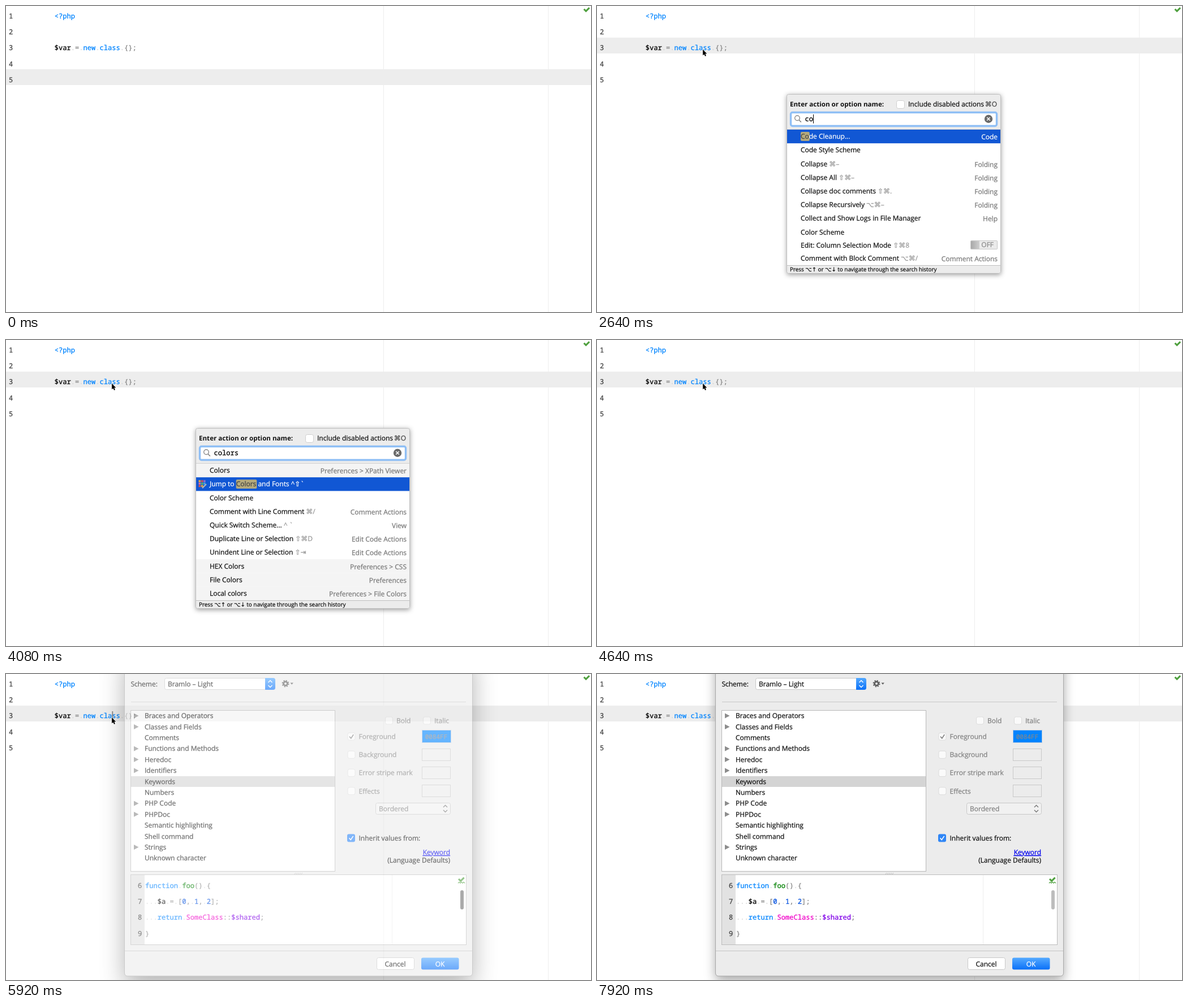
An HTML page that plays this animation: 1034x542 px, repeating every 8 s.

```html
<!DOCTYPE html>
<html lang="en">
<head>
<meta charset="utf-8">
<title>Color scheme lookup</title>
<style>
html, body { margin: 0; width: 100%; height: 100%; overflow: hidden; background: #fff; }
svg { display: block; }
text { font: 11.97px "Open Sans", "DejaVu Sans", sans-serif; white-space: pre; text-rendering: geometricPrecision; stroke-width: .25px; }
.mono { font: 12.083px "Noto Sans Mono", "DejaVu Sans Mono", monospace; stroke-width: .3px; }
.small { font-size: 9.9px; }
.bold { font-weight: bold; font-size: 11.6px; stroke-width: 0; }
</style>
</head>
<body>
<svg id="stage" width="1034" height="542" viewBox="0 0 1034 542"></svg>
<script>
const LOOP = 8000, STEP = 80;
const BLUE = '#0084ff', GREY = '#888', PALE = '#c8c8c8';
const stage = document.getElementById('stage');
const pen = document.createElement('canvas').getContext('2d');
pen.font = '11.97px "Open Sans", "DejaVu Sans", sans-serif';

const rect = (x, y, w, h, fill, more = '') =>
  `<rect x="${x}" y="${y}" width="${w}" height="${h}" fill="${fill}" ${more}/>`;
const box = (x, y, w, h, fill, stroke, r = 0) =>
  rect(x + .5, y + .5, w - 1, h - 1, fill, `stroke="${stroke}" rx="${r}"`);
// A hairline stroke in the fill colour gives glyphs a slightly heavier weight.
const ink = color => `fill="${color}" stroke="${color}"`;
const span = (s, color) => `<tspan ${ink(color)}>${s}</tspan>`;
const text = (x, y, s, color = '#111', more = '') =>
  `<text x="${x}" y="${y}" ${ink(color)} ${more}>${s}</text>`;
const line = (d, stroke, width = 1, more = '') =>
  `<path d="${d}" fill="none" stroke="${stroke}" stroke-width="${width}" ${more}/>`;
const shape = (d, fill, more = '') => `<path d="${d}" fill="${fill}" ${more}/>`;
const END = 'text-anchor="end"', MID = 'text-anchor="middle"', MONO = 'class="mono"';
const between = (t, a, b) => t >= a && t < b;

// Code made of [text, colour] pairs; spaces show as faint dots.
const code = (x, y, parts) => text(x, y, parts.map(([s, color]) =>
  span(s.replace(/</g, '&lt;').replace(/ +/g, gap => span('.'.repeat(gap.length), '#d4d4d4')), color)
).join(''), '#000', MONO);

const tick = (x, y) => line(`M${x} ${y}l3.6 3.6l6 -6`, '#4fa03f', 3);
const arrows = (x, y, color) =>
  line(`M${x - 3.5} ${y - 2.5}l3.5 -3.5l3.5 3.5M${x - 3.5} ${y + 2.5}l3.5 3.5l3.5 -3.5`, color, 1.4);
const check = (x, y, color) => line(`M${x + 3.5} ${y + 7}l2.8 3.2l4.4 -6.6`, color, 1.6);

function editor(t) {
  const current = t < 1120 ? 4 : 2;
  let out = rect(0, 0, 1034, 542, '#fff') + rect(667, 0, 1, 542, '#ededed') + rect(958, 0, 1, 542, '#ededed');
  out += rect(0, current * 28, 1034, 28, '#ededed');
  for (let i = 0; i < 5; i++) out += text(5, 22 + i * 28.2, i + 1, '#444', MONO);
  out += code(85.7, 21.7, [['<?php', BLUE]]);
  out += code(85.7, 78.3, [['$var', '#000'], [' = ', GREY], ['new class', BLUE], [' {};', GREY]]);
  if (between(t, 1200, 2080) || between(t, 5760, 6080)) out += rect(187.4, 66, 1.8, 12, '#888');
  return out + tick(1021.5, 5.5);
}

function pointer(t) {
  if (t < 160 || t >= 6720) return '';
  const enter = 1 - (1 - Math.min(1, (t - 160) / 800)) ** 2;
  const leave = Math.max(0, (t - 6320) / 400) ** 2;
  const x = 503 - 316 * enter + 400 * leave, y = 460 - 383 * enter + 470 * leave;
  return shape('M0 0V10.6L2.4 8.4L4 12L5.9 11.2L4.3 7.6H7.4Z', '#000',
    `transform="translate(${x} ${y})" stroke="#fff" stroke-width="1.2" paint-order="stroke"`);
}

// Rows: name | shortcut | group
const collapse = ['Collapse|⌘–|Folding', 'Collapse All|⇧⌘–|Folding', 'Collapse doc comments|⇧⌘.|Folding',
  'Collapse Recursively|⌥⌘–|Folding', 'Collect and Show Logs in File Manager||Help', 'Color Scheme||'];
const column = 'Edit: Column Selection Mode|⇧⌘8|OFF';
const prefs = ['HEX Colors||Preferences &gt; CSS', 'File Colors||Preferences',
  'Local colors||Preferences &gt; File Colors'];
const colors = ['Colors||Preferences &gt; XPath Viewer', 'Jump to Colors and Fonts|^⇧`|', 'Color Scheme||',
  'Comment with Line Comment|⌘/|Comment Actions', 'Quick Switch Scheme...|^ `|View',
  'Duplicate Line or Selection|⇧⌘D|Edit Code Actions', 'Unindent Line or Selection|⇧⇥|Edit Code Actions', ...prefs];
const results = [
  [0, []],
  [2640, ['Code Cleanup...||Code', 'Code Style Scheme||', ...collapse, column,
    'Comment with Block Comment|⌥⌘/|Comment Actions']],
  [2800, [...collapse, column, ...prefs]],
  [2960, [colors[2], colors[0], colors[1], ...colors.slice(3)]],
  [3360, colors]
];
const keyTimes = [2560, 2640, 2800, 2960, 3040, 3280];

function paletteIcon(y) {
  const tones = ['#e8a33a', '#d9534f', '#8e6bd0', '#e06c9f', '#5bb56a', '#4aa3e0', '#d9534f', '#e8a33a'];
  return tones.map((c, i) => rect(340.5 + i % 3 * 4.3, y - 7 + (i / 3 | 0) * 4.3, 3.5, 3.5, c)).join('') +
    line(`M347 ${y + 7}L354 ${y}`, '#b8b8b8', 2.2);
}

function row(spec, y, h, selected, query) {
  const [name, keys, group] = spec.split('|');
  const mid = y + h / 2, base = mid + 4;
  let out = '';
  if (selected) out += rect(336, y, 377, h, '#1157d4');
  else if (group.startsWith('Preferences')) out += rect(336, y, 377, h, '#f4f4f4');
  let label = name;
  const at = name.toLowerCase().indexOf(query);
  if (selected && at >= 0) {
    const hit = name.slice(at, at + query.length);
    out += rect(360 + pen.measureText(name.slice(0, at)).width, mid - 8, pen.measureText(hit).width + 1, 16,
      '#b5aa7c', 'rx="2"');
    label = name.slice(0, at) + span(hit, '#444') + name.slice(at + hit.length);
  }
  if (name.startsWith('Jump')) out += paletteIcon(mid);
  out += text(360, base, `${label} ${span(keys, selected ? '#fff' : '#999')}`, selected ? '#fff' : '#111');
  if (group === 'OFF') {
    return out + box(660, mid - 8.5, 48, 16, '#ebebeb', '#c6c6c6', 1) +
      rect(661, mid - 7.5, 15, 14, 'url(#knob)') + text(701, base - 1, 'OFF', '#8a8a8a', END);
  }
  return out + text(708, base + 1, group, selected ? '#fff' : '#777', END);
}

function popup(t) {
  if (!between(t, 2240, 4640)) return '';
  const alpha = t < 2320 ? .6 : t < 4480 ? 1 : t < 4560 ? .6 : .25;
  const query = 'colors'.slice(0, keyTimes.filter(k => t >= k).length);
  const rows = results.filter(r => t >= r[0]).pop()[1];
  const chosen = t >= 3600 ? 1 : 0;
  let y = 219, list = '';
  rows.forEach((spec, i) => {
    const h = spec === column ? 22.2 : 24.2;
    list += row(spec, y, h, i === chosen, query);
    y += h;
  });
  const bottom = Math.round(rows.length ? y + 14.7 : y);
  let out = rect(335.5, 156, 378.5, bottom - 156, '#ececec',
    'rx="3" style="filter:drop-shadow(0 2px 4px rgba(0,0,0,.4))"');
  if (rows.length) {
    out += rect(336, 219, 377, y - 219, '#fff') + list + rect(336, 218, 377, 1, '#d0d0d0') +
      rect(336, y, 377, 1, '#c0c0c0') +
      text(341, y + 11.2, 'Press ⌥↑ or ⌥↓ to navigate through the search history', '#111', 'class="small"');
  }
  out += box(335, 156, 379, bottom - 156, 'none', '#c0c0c0', 3);
  out += text(341, 178, 'Enter action or option name:', '#111', 'class="bold"');
  out += box(529, 167, 15, 15, '#fff', '#cfcfcf', 3) + text(550, 178, 'Include disabled actions') +
    text(707, 178, '⌘O', '#444', END);
  out += rect(342.5, 188.5, 364, 24, '#fff', 'rx="3" stroke="#8fbff5" stroke-width="3.4"');
  out += '<circle cx="354" cy="198.5" r="4.3" fill="none" stroke="#777" stroke-width="1.2"/>' +
    line('M357.2 202l3.6 3.8', '#777', 1.4);
  out += text(367.5, 204, query, '#000', MONO);
  if (between(t, 2320, 4080)) out += rect(367.5 + query.length * 7.25, 192, 1, 16, '#000');
  if (query) out += '<circle cx="692" cy="200" r="7.2" fill="#6a6a6a"/>' +
    line('M689.3 197.3l5.4 5.4m0 -5.4l-5.4 5.4', '#fff', 1.5);
  return `<g opacity="${alpha}">${out}</g>`;
}

const tree = ['+Braces and Operators', '+Classes and Fields', 'Comments', '+Functions and Methods', '+Heredoc',
  '+Identifiers', 'Keywords', 'Numbers', '+PHP Code', '+PHPDoc', 'Semantic highlighting', 'Shell command',
  '+Strings', 'Unknown character'];

function treePane() {
  let out = box(220, 64, 362, 286, '#fff', '#b8b8b8');
  tree.forEach((item, i) => {
    const y = 74 + i * 19.4;
    if (item === 'Keywords') out += rect(221, 181, 360, 19, '#d4d4d4');
    if (item[0] === '+') out += shape(`M226 ${y - 4.5}l8.5 4.5l-8.5 4.5z`, '#8c8c8c');
    out += text(245, y + 4.2, item.replace('+', ''));
  });
  return out;
}

function attributes() {
  const option = (x, y, label) =>
    box(x, y - 7, 14, 14, '#fafafa', '#dcdcdc', 3) + text(x + 20, y + 4.3, label, '#808080');
  let out = option(670, 82.5, 'Bold') + option(737, 82.5, 'Italic');
  ['Foreground', 'Background', 'Error stripe mark', 'Effects'].forEach((label, i) => {
    const y = 110.7 + i * 32.2;
    out += option(603.5, y, label);
    if (i) out += box(735, Math.round(y) - 11, 51, 22, '#ececec', PALE);
  });
  out += check(603.5, 103.7, '#808080') + box(735, 99, 52, 23, BLUE, '#a9c4e4') +
    text(760.5, 114.5, '0084FF', '#7c8794', 'class="mono" text-anchor="middle" style="font-size:11px"');
  out += box(653, 228, 133, 21, '#f1f1f1', PALE, 3) + text(659, 243, 'Bordered', '#808080') +
    arrows(776.5, 238.5, '#777');
  out += rect(603, 283.5, 14, 14, '#2f86f6', 'rx="3"') + check(603, 283.5, '#fff') +
    text(623.5, 295, 'Inherit values from:');
  return out + text(785, 320, 'Keyword', '#0000ee', END + ' text-decoration="underline"') +
    text(785, 333.5, '(Language Defaults)', '#111', END);
}

function preview(t) {
  const fade = Math.min(1, Math.max(0, (t - 7280) / 320));
  const shade = Math.round(115 + 73 * fade);
  let out = box(220, 355, 594, 125, '#fff', '#bcbcbc') + rect(221, 356, 24, 123, '#e2e2e2') +
    rect(682, 356, 1, 123, '#ededed');
  for (let i = 0; i < 4; i++) out += text(233, 379 + i * 28.2, i + 6, '#444', MONO);
  out += code(246, 379, [['function ', BLUE], ['foo', '#008000'], ['() {', GREY]]);
  out += code(246, 407.2, [['   ', GREY], ['$a', '#000'], [' = [', GREY], ['0', '#0050e0'], [', ', GREY],
    ['1', '#0050e0'], [', ', GREY], ['2', '#0050e0'], ['];', GREY]]);
  out += code(246, 435.4, [['   ', GREY], ['return ', BLUE], ['SomeClass', '#f000c8'], ['::', GREY],
    ['$shared', '#8000e8'], [';', GREY]]);
  out += code(246, 463.6, [['}', GREY]]);
  out += tick(800, 363) + line('M799 370.5l2 -2l2 2l2 -2l2 2l2 -2l2 2', '#4fa03f', 1.1);
  return out + rect(803, 383, 6, 34, `rgb(${shade},${shade},${shade})`, 'rx="3"');
}

function dialog(t) {
  if (t < 5920) return '';
  const shadow = t < 6080 ? '0 18px 22px rgba(0,0,0,.5)' : '0 8px 10px rgba(0,0,0,.35)';
  let out = rect(210, -40, 614.5, 575, '#ececec', `rx="5" style="filter:drop-shadow(${shadow})"`) +
    rect(209.5, -40, 615, 575, 'none', 'rx="5" stroke="#a8a8a8"');
  out += text(220.5, 22, 'Scheme:') + box(280, 7, 196, 21, '#fff', PALE, 3) +
    text(286, 21.7, 'Bramlo – Light') +
    shape('M458 7h14q4 0 4 4v13q0 4 -4 4h-14z', 'url(#accent)') + arrows(467, 17.5, '#fff');
  out += '<circle cx="494" cy="17" r="3.4" fill="none" stroke="#5c5c5c" stroke-width="2.6"/>' +
    '<circle cx="494" cy="17" r="5.4" fill="none" stroke="#5c5c5c" stroke-width="2" stroke-dasharray="2.1 2.14"/>' +
    shape('M502.5 15.5h5.4l-2.7 3.2z', '#5c5c5c');
  out += rect(221, 49, 592, 1, PALE) + treePane() + attributes();
  out += line('M510 355l2 -3m1 3l2 -3m1 3l2 -3m1 3l2 -3m1 3l2 -3', '#b4b4b4', .8);
  out += preview(t) + rect(210, 490, 614, 1, '#c4c4c4');
  out += box(655, 502, 67, 22, '#fff', PALE, 3) + text(688, 517.7, 'Cancel', '#111', MID);
  out += rect(734, 502.5, 66.5, 21, 'url(#accent)', 'rx="3"') + text(767, 517.7, 'OK', '#fff', MID);
  return `<g opacity="${t < 6000 ? .6 : 1}">${out}</g>`;
}

const gradient = (id, from, to, turn) => `<linearGradient id="${id}" gradientTransform="rotate(${turn})">
  <stop stop-color="${from}"/><stop offset="1" stop-color="${to}"/></linearGradient>`;
const defs = `<defs>${gradient('accent', '#55aaff', '#0a70f8', 90)}${gradient('knob', '#a8a8a8', '#cfcfcf', 0)}</defs>`;

let shown = -1;
const start = performance.now();
function frame() {
  const t = Math.floor((performance.now() - start) % LOOP / STEP) * STEP;
  if (t !== shown) {
    stage.innerHTML = defs + editor(t) + popup(t) + dialog(t) + pointer(t);
    shown = t;
  }
  requestAnimationFrame(frame);
}
frame();
</script>
</body>
</html>
```
